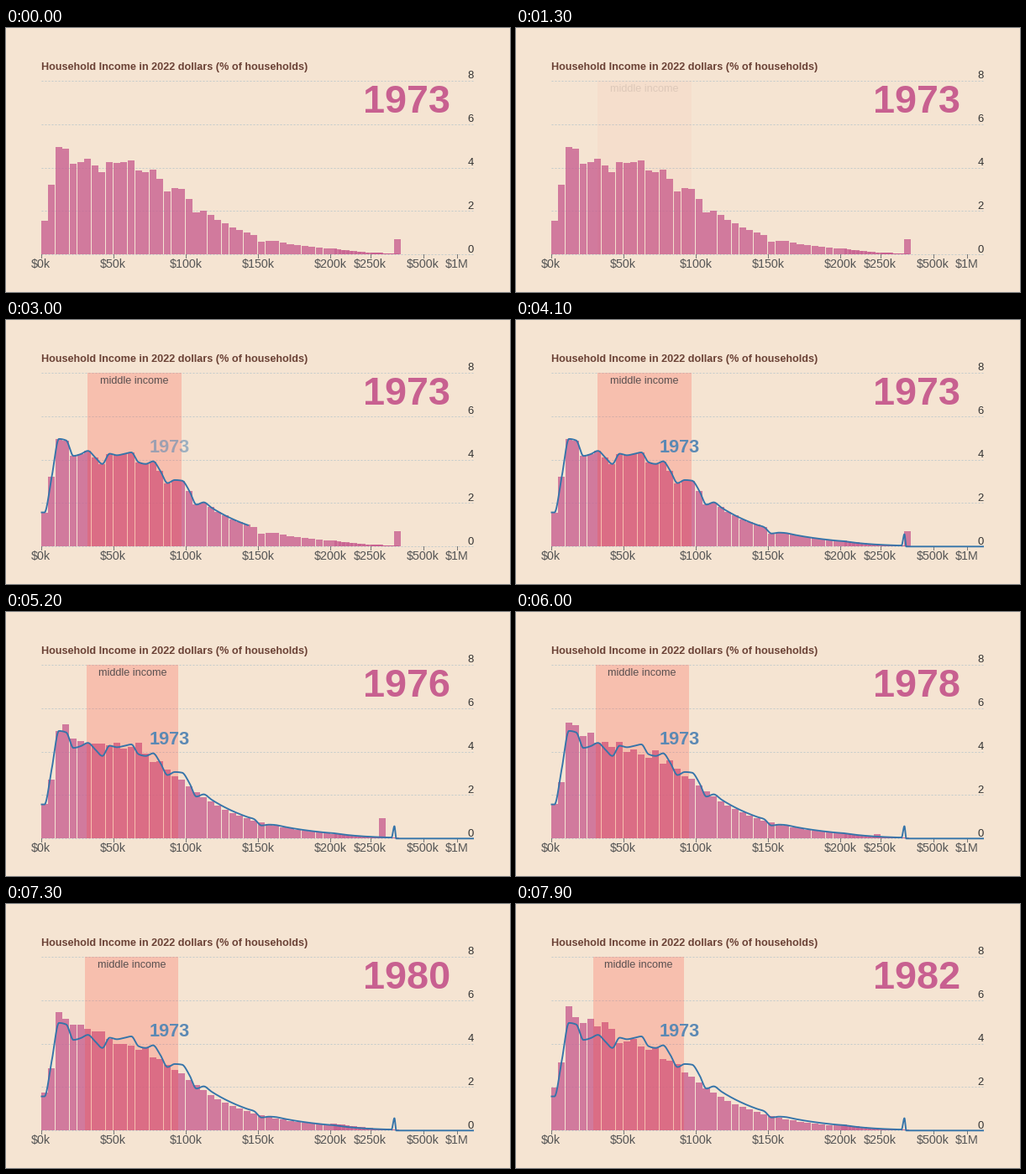
A matplotlib script for the animation above (8 s loop, 600x315 px).

```python
import numpy as np
import matplotlib.pyplot as plt
from matplotlib.animation import FuncAnimation
from matplotlib.collections import PolyCollection
from matplotlib.patches import Rectangle

W, H, DPI = 600, 315, 100
STEP, LOOP = 100, 8000
PX = 72 / DPI
LEFT, RIGHT, TOP, BASE, UNIT = 41.5, 557, 62.8, 270.3, 25.94
BINS, BIN, BAR_W = 40, 8.617, 8.05
BG, PINK, BLUE, BROWN = "#f5e4d2", "#c86090", "#3574a9", "#6b4236"

plt.rcParams["font.family"] = "Liberation Sans"


def y_of(v):
    return BASE - UNIT * np.asarray(v)


def cubic(t, start, dur):
    u = min(max((t - start) / dur, 0), 1)
    return 4 * u ** 3 if u < .5 else 1 - 4 * (1 - u) ** 3


def shares(head, at_100k):
    """Percent of households per $5k bin; high incomes fall off exponentially."""
    v = at_100k * np.exp(-.119 * (np.arange(BINS) - 20))
    v[:len(head)] = head
    return v


POSES = [
    shares([1.57, 3.2, 4.95, 4.88, 4.17, 4.25, 4.4, 4.1, 3.8, 4.27, 4.2,
            4.26, 4.33, 3.88, 3.8, 3.92, 3.48, 2.92, 3.06, 3.03, 2.57, 1.93], 2.58),
    shares([1.6, 2.7, 4.95, 5.25, 4.6, 4.5, 4.35, 4.37, 4.37,
            4.3, 4.4, 4.12, 4.2, 4.4, 3.9, 3.52, 3.55, 3.18, 2.85], 2.42),
    shares([1.6, 2.6, 5.35, 5.2, 4.7, 4.85, 4.4, 4.45, 4.2,
            4.45, 4, 4.1, 3.85, 3.72, 4.07, 3.45, 3.6, 3.2, 2.85], 2.45),
    shares([1.5, 2.52, 5.15, 5.08, 4.78, 4.55, 4.53, 4.08, 4.45,
            4.4, 3.85, 3.7, 3.95, 3.68, 3.88, 3.43, 3.35, 3, 2.88], 2.5),
    shares([1.97, 3.15, 5.7, 5.22, 4.93, 5.15, 4.8, 5, 4.68,
            4.03, 4.1, 4.23, 3.85, 3.72, 3.8, 3.28, 3.2, 3.05, 2.68], 2.2),
]
POSES[0][30:32] = .6, .64

POSE_T = [4150, 5200, 6000, 6600, 7900]
BAND_LO = [97.3, 96, 94.8, 96, 91.8]
BAND_HI = [209.2, 205.2, 205.6, 211.6, 200.2]
TOP_X = [461.7, 443.6, 425.5, 393.3, 387]
TOP_V = [.7, .95, .22, .4, .2]
TAIL_V = [.28, .22, .25, .42, .27]
KEYS = np.vstack([np.transpose(POSES), BAND_LO, BAND_HI, TOP_X, TOP_V, TAIL_V])

MAIN_X = LEFT + BIN * np.arange(BINS)
TAIL_X = np.append(386.2 + 4.75 * np.arange(10), 433.7 + 1.26 * np.arange(22))


def tail(amp):
    return amp * np.exp(-(TAIL_X - 386) / 40)


def monotone(x, y, n=24):
    """Monotone cubic curve through the points."""
    h = np.diff(x)
    s = np.diff(y) / h
    p = (s[:-1] * h[1:] + s[1:] * h[:-1]) / (h[:-1] + h[1:])
    low = np.minimum(np.minimum(abs(s[:-1]), abs(s[1:])), abs(p) / 2)
    m = np.zeros(len(x))
    m[1:-1] = (np.sign(s[:-1]) + np.sign(s[1:])) * low
    u = np.linspace(0, 1, n, endpoint=False)
    h, a, b = h[:, None], y[:-1, None], y[1:, None]
    ys = (a * (1 + 2 * u) * (1 - u) ** 2 + m[:-1, None] * h * u * (1 - u) ** 2
          + b * u ** 2 * (3 - 2 * u) + m[1:, None] * h * u ** 2 * (u - 1))
    xs = x[:-1, None] + h * u
    return np.append(xs.ravel(), x[-1]), np.append(ys.ravel(), y[-1])


fig = plt.figure(figsize=(W / DPI, H / DPI), dpi=DPI, facecolor=BG)
ax = fig.add_axes([0, 0, 1, 1])
ax.set(xlim=(0, W), ylim=(H, 0))
ax.axis("off")


def label(x, y, s, size, color, ha="center", **kw):
    return ax.text(x, y, s, fontsize=size * PX, color=color, ha=ha, va="baseline", **kw)


for v in range(0, 9, 2):
    ax.plot([LEFT, RIGHT], [y_of(v)] * 2, color="#c3cbcc", lw=PX,
            dashes=(2, 2), dash_capstyle="butt", zorder=1)
    label(RIGHT, y_of(v) - 2.8, str(v), 13, "#333333", "right", zorder=6)

ticks = [(f"${k}k", LEFT + k * BIN / 5) for k in range(0, 201, 50)]
ticks += [("$250k", 433.7), ("$500k", 496.7), ("$1M", 537)]
for name, x in ticks:
    ax.plot([x, x], [BASE, BASE + 4], color="#777777", lw=PX, zorder=1)
    label(x, 286, name, 14.3, "#555555")

label(LEFT, 50, "Household Income in 2022 dollars (% of households)", 12.6, BROWN,
      "left", weight="bold")

bars = PolyCollection([], facecolors=PINK, edgecolors="none", alpha=.8, zorder=2)
ax.add_collection(bars, autolim=False)
band = Rectangle((0, TOP), 1, BASE - TOP, fc="#ff4637", ec="none", zorder=3)
ax.add_patch(band)
band_text = label(0, 75.5, "middle income", 12.6, "#5a5050", zorder=4)
line, = ax.plot([], [], color=BLUE, lw=1.9 * PX, zorder=5, solid_capstyle="butt")
line_text = label(194.3, 157.8, "1973", 21.6, "#5b89b4", weight="bold", zorder=5)
year_text = label(528.8, 101.3, "1973", 46.8, PINK, "right", weight="bold", zorder=4)

# Outline of the first year, ending in the top-coded spike
curve_x = np.concatenate([[LEFT], MAIN_X + BIN / 2, TAIL_X[1:] - 1.2,
                          [462.4, 464.6, 466, RIGHT]])
curve_v = np.concatenate([POSES[0][:1], POSES[0], tail(TAIL_V[0])[1:], [.57, 0, 0, 0]])
CX, CY = monotone(curve_x, y_of(curve_v))
ARC = np.append(0, np.cumsum(np.hypot(np.diff(CX), np.diff(CY))))


def bar(x, v):
    y = y_of(v)
    return [(x, BASE), (x, y), (x + BAR_W, y), (x + BAR_W, BASE)]


def draw(i):
    t = i * STEP
    pose = np.array([np.interp(t, POSE_T, row) for row in KEYS])
    lo, hi, top_x, top_v, amp = pose[BINS:]
    xs = np.concatenate([MAIN_X, TAIL_X, [top_x]])
    vs = np.concatenate([pose[:BINS], tail(amp), [top_v]])
    bars.set_verts([bar(x, v) for x, v in zip(xs, vs)])

    shown = cubic(t, 1000, 900)
    band.set_x(lo)
    band.set_width(hi - lo)
    band.set_alpha(.23 * shown)
    band_text.set_x((lo + hi) / 2)
    band_text.set_alpha(shown)

    drawn = cubic(t, 1950, 2000)
    end = drawn * ARC[-1]
    n = np.searchsorted(ARC, end)
    line.set_data(np.append(CX[:n], np.interp(end, ARC, CX)),
                  np.append(CY[:n], np.interp(end, ARC, CY)))
    line.set_visible(drawn > 0)
    line_text.set_alpha(drawn)

    year_text.set_text(str(1973 + max(0, (t - 3750) // 450)))
    return bars, band, band_text, line, line_text, year_text


anim = FuncAnimation(fig, draw, frames=LOOP // STEP, interval=STEP, repeat=True)
plt.show()
```
